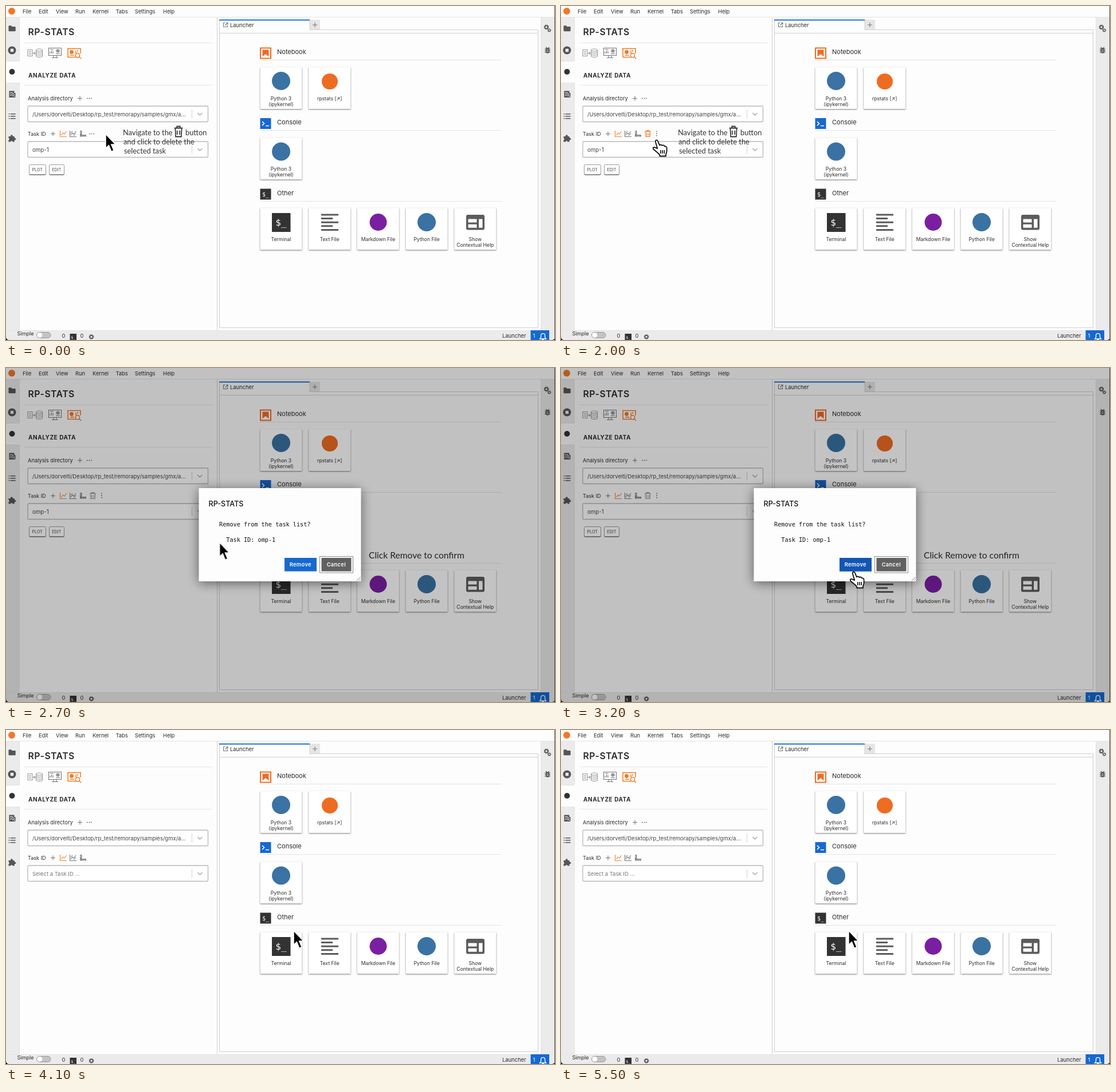
Write an HTML page that moves like this. It is 958x584 px and loops after 5600 ms.

```html
<!DOCTYPE html>
<html lang="en">
<head>
<meta charset="utf-8">
<title>Delete a task</title>
<style>
  html, body { margin: 0; width: 100%; height: 100%; overflow: hidden; background: #fefdfe; }
  svg { display: block; width: 958px; height: 584px; }
  text { font: 9.3px Inter, sans-serif; fill: #2b2b2b; white-space: pre; }
  .c { text-anchor: middle; }
  .line { fill: none; stroke: #e4e4e4; }
  .ui { fill: none; stroke: #777; stroke-width: 1.1; }
  .dark { fill: #555; }
  .title { font-size: 11px; }
  .label { font-size: 8.6px; text-anchor: middle; }
  .small { font-size: 7.2px; text-anchor: middle; fill: #444; }
  .note { font: 12.8px Lato, sans-serif; fill: #333; }
  .mono { font: 10.2px "DejaVu Sans Mono", monospace; fill: #111; }
  .btn { font-size: 9.4px; font-weight: 600; letter-spacing: .3px; fill: #fff; text-anchor: middle; }
  .prompt { font-family: "DejaVu Sans Mono", monospace; fill: #fff; text-anchor: middle; }
  .card { fill: #fff; filter: drop-shadow(0 1px 1.3px #0008); }
</style>
</head>
<body>
<svg viewBox="0 0 958 584">
  <defs>
    <g id="trash" fill="none" stroke="currentColor" stroke-width="1.2">
      <path d="M-5.2-3.6H5.2M-2-3.8V-5.4H2V-3.8M-4-3.4L-3.5 5.4H3.5L4-3.4M-1.6-1V3.4M1.6-1V3.4"/>
    </g>
    <g id="select">
      <rect x="38" y="-14" width="314.5" height="27.5" rx="2" fill="#fff" stroke="#b9b9b9" stroke-width="1.3"/>
      <path d="M324.5-8V8" stroke="#d2d2d2"/>
      <path d="M334.3-2L338.3 2 342.3-2" fill="none" stroke="#aaa" stroke-width="1.5"/>
    </g>
    <g id="gear">
      <circle r="2.6" fill="none" stroke="#555" stroke-width="1.7"/>
      <circle r="3.8" fill="none" stroke="#555" stroke-width="1.3" stroke-dasharray="1.5 1.48"/>
    </g>
  </defs>

  <!-- window frame -->
  <rect width="958" height="584" fill="#fefdfe"/>
  <path d="M0 20H23V567H0ZM933 20H958V567H933ZM0 567H958V584H0Z" fill="#ebebeb"/>
  <path d="M0 96.5H23V134.5H0Z" fill="#fefdfe"/>
  <path class="line" stroke="#d5d5d5" d="M0 19.5H958M23.5 20V96M23.5 134V567M0 96.5H23M0 134.5H23M933.5 20V567M0 567.5H958"/>
  <path d="M368.5 20V567" stroke="#d0d0d0"/>
  <circle cx="10" cy="9" r="6" fill="#f37726"/>
  <g id="menu"></g>

  <!-- side bars -->
  <path class="dark" d="M4.5 35.5Q4.5 34.3 5.7 34.3H9L10.5 36H15.5Q16.7 36 16.7 37.2V43Q16.7 44.2 15.5 44.2H5.7Q4.5 44.2 4.5 43Z"/>
  <circle cx="10.5" cy="77.5" r="7" class="dark"/>
  <rect x="7.8" y="74.8" width="5.4" height="5.4" fill="#ebebeb"/>
  <circle cx="10.5" cy="115" r="5" fill="#333"/>
  <path class="dark" d="M5.5 148.5H14.5V152H16.5V160H5.5Z"/>
  <path d="M7 151.5H12M7 154H9M7 156.5H9" stroke="#eee"/>
  <circle cx="12.2" cy="155.2" r="2" fill="none" stroke="#eee"/>
  <path d="M13.5 156.7L16 159.2" stroke="#eee"/>
  <path d="M4.7 188.8H6.4M7.7 188.8H16.6M4.7 192.8H6.4M7.7 192.8H16.6M4.7 196.8H6.4M7.7 196.8H16.6" stroke="#555" stroke-width="1.5"/>
  <path class="dark" d="M4.5 228H8A2 2 0 1 1 11.7 228H14.7V230.6A2 2 0 1 1 14.7 234.4V237.5H11.7A1.9 1.9 0 0 0 8 237.5H4.5V234.3A1.9 1.9 0 0 0 4.5 230.7Z"/>
  <use href="#gear" x="943" y="37"/>
  <use href="#gear" transform="translate(948 42.5) scale(.75)"/>
  <ellipse cx="945" cy="78" rx="3.4" ry="4.7" class="dark"/>
  <path d="M940 75H950M940 78H950M940 81H950M942 72L944 74M948 72L946 74" stroke="#555" stroke-width="1.2"/>
  <path d="M943.5 77H946.5M943.5 79.6H946.5" stroke="#ebebeb"/>

  <!-- left panel -->
  <text x="38.5" y="51.3" style="font-size:15.8px;font-weight:600;letter-spacing:.5px">RP-STATS</text>
  <path class="line" d="M32 64.5H360M32 138.5H360"/>
  <g fill="none" stroke="#999" stroke-width="1.1">
    <path d="M38 76.5H46V87.5H38ZM40 79.5H44M40 82H44M40 84.5H44M46 82.5H51M49 80.5L51 82.5 49 84.5"/>
    <path d="M52.5 77V87.5C52.5 90 63.5 90 63.5 87.5V77M52.5 80.5C52.5 83 63.5 83 63.5 80.5M52.5 84C52.5 86.5 63.5 86.5 63.5 84"/>
    <ellipse cx="58" cy="77" rx="5.5" ry="2"/>
    <path stroke="#777" d="M74.5 73.5H96.5V86.5H74.5ZM83 86.5V90M88 86.5V90M80 90.5H91M77 83V80M79.5 83V78M82 83V79M77 76H83M87 83.5H94"/>
    <circle cx="90.5" cy="78.5" r="2.7" fill="#999"/>
  </g>
  <g fill="none" stroke="#ee7b22" stroke-width="1.5">
    <path d="M122 89.5H108V74.5H130V83M107 74.5H131M122 83V78M125 80V77M112 86H119"/>
    <circle cx="114.5" cy="80.5" r="2.7" fill="#ee7b22"/>
    <circle cx="125" cy="86.3" r="3.6" fill="#fff"/>
    <path d="M127.8 89L131.3 92.3"/>
  </g>
  <text x="39" y="125" style="font-size:10px;font-weight:700;letter-spacing:.55px">ANALYZE DATA</text>
  <text x="38" y="165">Analysis directory</text>
  <path class="ui" d="M125 161.5H133M129 157.5V165.5"/>
  <path d="M141 161.5H150" stroke="#666" stroke-width="1.7" stroke-dasharray="1.7 1.9"/>
  <use href="#select" y="189"/>
  <text x="46" y="192.5" style="font-size:9.5px;fill:#444">/Users/dorvelti/Desktop/rp_test/remorapy/samples/gmx/a...</text>
  <text x="38" y="227" style="font-size:9.1px">Task ID</text>
  <path class="ui" d="M78 223.5H86M82 219.5V227.5"/>
  <path d="M94.5 218V228.5H106M96.5 226L99.5 222 102 224 105.5 219" fill="none" stroke="#ee8a32" stroke-width="1.2"/>
  <path class="ui" d="M111.5 218V228.5H123M113 226L116 222 118 224 122 219M113 222.5L116 219M118 227L122 222.5"/>
  <path d="M129 218H132.5V225H140V228.5H129Z" fill="#8b8b8b"/>
  <path d="M129 220H131M129 222H131M134 228.5V226.8M137 228.5V226.8" stroke="#eee" stroke-width=".8"/>
  <path id="dots" d="M145 223.5H154" stroke="#666" stroke-width="1.7" stroke-dasharray="1.7 1.9"/>
  <path id="menuDots" d="M167 218.5V227.5" stroke="#777" stroke-width="1.7" stroke-dasharray="1.7 1.9"/>
  <use id="trashHot" href="#trash" x="151.5" y="223" color="#ee7b22"/>
  <use id="trashIdle" href="#trash" x="151.5" y="223" color="#959595"/>
  <use href="#select" y="251"/>
  <text id="placeholder" x="46" y="254.5" style="font-size:9.5px;fill:#777">Select a Task ID ...</text>
  <g id="task">
    <text x="46" y="254.5" style="font-size:9.7px;fill:#444">omp-1</text>
    <g fill="#fff" stroke="#999" style="filter:drop-shadow(.5px 1px .7px #0007)">
      <rect x="40.5" y="277.5" width="29" height="17" rx="2"/>
      <rect x="75.5" y="277.5" width="26" height="17" rx="2"/>
    </g>
    <text class="small" x="54.7" y="288.6">PLOT</text>
    <text class="small" x="88.3" y="288.6">EDIT</text>
  </g>

  <!-- launcher -->
  <path d="M530 24H548V42H530Z" fill="#e6e6e6"/>
  <path d="M372.5 24V562.5H928.5V41.5H530V24M372.5 47.5H928.5" fill="none" stroke="#cfcfcf"/>
  <path d="M372 24.5H530" stroke="#1976d2" stroke-width="2"/>
  <path class="ui" d="M382.5 29.5H379.5V36.5H386.5V33.5M384 29.5H387V32.5M387 29.5L382.5 34M535 33H543M539 29V37"/>
  <text x="391" y="36.5" style="font-size:9.4px">Launcher</text>
  <g id="sections"></g>
  <rect x="444" y="73.5" width="18" height="18" fill="#fff" stroke="#ee6c22" stroke-width="2"/>
  <path d="M447.5 76.5H458.5V88.5L453 84 447.5 88.5Z" fill="#ee6c22"/>
  <rect x="443.5" y="196" width="19" height="19" fill="#1769cf"/>
  <path d="M447 202L450.5 205.5 447 209M453 209.5H459" fill="none" stroke="#fff" stroke-width="1.6"/>
  <rect x="443.5" y="319.5" width="19" height="19" fill="#333"/>
  <text class="prompt" x="453" y="333" style="font-size:10px">$_</text>
  <g id="cards"></g>
  <circle cx="480" cy="131" r="16" fill="#3a72a4"/>
  <circle cx="565" cy="132" r="14" fill="#ee6c22"/>
  <circle cx="480" cy="254.5" r="16" fill="#3a72a4"/>
  <circle cx="649.5" cy="378" r="15" fill="#7b1fa2"/>
  <circle cx="734" cy="378" r="16" fill="#3a72a4"/>
  <rect x="464" y="362" width="32.5" height="33" fill="#333"/>
  <text class="prompt" x="480" y="384" style="font-size:16px">$_</text>
  <path d="M550 365H580M550 371.6H570M550 378.2H580M550 384.8H570M550 391.4H580" stroke="#5c5c5c" stroke-width="3"/>
  <rect x="803" y="365" width="32" height="26.5" rx="3" fill="#5c5c5c"/>
  <path d="M806.5 372.5H821.5V378.5H806.5ZM806.5 381.8H821.5V387.8H806.5ZM825 372.5H831.5V387.8H825Z" fill="#fff"/>

  <!-- status bar -->
  <text x="19.5" y="576.3" style="font-size:9.1px">Simple</text>
  <rect x="53.5" y="570.5" width="24.5" height="10" rx="5" fill="#c4c4c4" stroke="#999"/>
  <circle cx="58.7" cy="575.5" r="4.5" fill="#fff"/>
  <text class="c" x="100.5" y="580">0</text>
  <rect x="111.5" y="573" width="11.5" height="11" fill="#333"/>
  <text class="prompt" x="117.2" y="581.5" style="font-size:6.5px">$_</text>
  <text class="c" x="132.5" y="580">0</text>
  <use href="#gear" x="149" y="578.5"/>
  <text x="866" y="580" style="font-size:9.4px">Launcher</text>
  <rect x="915.5" y="567" width="32.5" height="17" fill="#1769cf"/>
  <text class="c" x="921.5" y="580" style="fill:#fff">1</text>
  <path d="M931.5 582H942.5L940.5 579.5V576C940.5 571.5 933.5 571.5 933.5 576V579.5ZM935.5 583.3H938.5" fill="none" stroke="#fff" stroke-width="1.3"/>
  <path d="M0 578V584H6Q0 584 0 578ZM958 578V584H952Q958 584 958 578Z"/>
  <path d="M957.5 0V584" stroke="#555"/>

  <!-- guidance and dialog -->
  <g id="hint">
    <text class="note" x="204" y="225.7">Navigate to the</text>
    <text class="note" x="313" y="225.7">button</text>
    <text class="note" x="205" y="241.8">and click to delete the</text>
    <text class="note" x="206" y="257.8">selected task</text>
    <use href="#trash" transform="translate(301 219.5) scale(1.4 1.65)" color="#333"/>
  </g>
  <g id="dialog">
    <rect width="958" height="584" opacity=".235"/>
    <rect x="336.5" y="210" width="283" height="163" rx="1" fill="#fefdfe" style="filter:drop-shadow(0 3px 10px #0008)"/>
    <text x="353.5" y="242.3" style="font-size:12.6px;font-weight:500;fill:#111">RP-STATS</text>
    <text class="mono" x="372" y="277">Remove from the task list?</text>
    <text class="mono" x="384.3" y="303.7">Task ID: omp-1</text>
    <rect x="486" y="332" width="56" height="23.5" fill="#1669cf"/>
    <rect id="removeHot" x="486" y="332" width="56" height="23.5" fill="#1256b5"/>
    <text class="btn" x="513.8" y="347.3">Remove</text>
    <rect x="547.5" y="329.5" width="58" height="28.5" fill="none" stroke="#8a8a8a"/>
    <rect x="550.5" y="332" width="52" height="23.5" fill="#616161"/>
    <text class="btn" x="576.3" y="347.3">Cancel</text>
    <path d="M612 372L618.5 365.5M616 372L618.5 369.5" stroke="#888"/>
  </g>
  <text id="confirm" class="note" x="633" y="333" style="font-size:15.6px;fill:#222">Click Remove to confirm</text>

  <g id="cursor">
    <path id="arrow" d="M0 0V24.5L5.4 19.4 9.8 30.3 14 28.5 9.6 17.9H17Z" fill="#000" stroke="#fff" stroke-width="1.4"/>
    <g id="hand" stroke="#111" stroke-linejoin="round">
      <path d="M7 9C6 5 9.8 4.4 11 7.4L14 14.4C15.8 13 17.8 13.3 18.6 15.1 20.4 13.8 22.4 14.6 23 16.5 25 15.8 26.6 17.2 26.6 19.4V24.5C26.6 27.5 25 29 25 31V33.5H14.3V31.5C12.5 28.5 8.5 26 4 22 1.2 19.4 3.6 16.8 6.4 18.4L10.3 20.3Z"
        fill="#fff" stroke-width="1.8"/>
      <path d="M15.8 23V29M19 23V29M22.2 23V29" stroke-width="1.6"/>
    </g>
  </g>
</svg>
<script>
  const LOOP = 5600;
  const byId = id => document.getElementById(id);
  const label = (x, y, s, cls = '') => `<text class="${cls}" x="${x}" y="${y}">${s}</text>`;

  byId('menu').innerHTML = [
    ['File', 29], ['Edit', 57], ['View', 87], ['Run', 121],
    ['Kernel', 151], ['Tabs', 191.5], ['Settings', 224.7], ['Help', 274]
  ].map(([name, x]) => label(x, 12.7, name)).join('');

  byId('sections').innerHTML = [['Notebook', 84], ['Console', 207], ['Other', 330.5]]
    .map(([name, y]) => label(473, y, name, 'title') +
      `<path class="line" d="M443 ${Math.round(y) + 10.5}H864"/>`).join('');

  const rows = [
    [107, ['Python 3|(ipykernel)', 'rpstats [↗]']],
    [230.3, ['Python 3|(ipykernel)']],
    [353.3, ['Terminal', 'Text File', 'Markdown File', 'Python File', 'Show|Contextual Help']]
  ];
  byId('cards').innerHTML = rows.map(([y, names]) => names.map((name, i) => {
    const x = 443.5 + 84.7 * i;
    return `<rect class="card" x="${x}" y="${y}" width="73" height="73" rx="1"/>` +
      name.split('|').map((s, k) => label(x + 36.5, y + 57.5 + 10.2 * k, s, 'label')).join('');
  }).join('')).join('');

  // Hard on/off switching over [from, to] spans in ms.
  function show(id, ...spans) {
    const times = [0, ...spans.flat(), LOOP];
    const marks = [...new Set(times)].sort((a, b) => a - b);
    const frames = marks.map(t => ({
      offset: t / LOOP,
      opacity: spans.some(([from, to]) => t >= from && t < to) ? 1 : 0,
      easing: 'step-end'
    }));
    byId(id).animate(frames, { duration: LOOP, iterations: Infinity });
  }

  const OPEN = 1000, CLICK = 2100, REMOVED = 4100;
  show('dots', [0, OPEN]);
  show('menuDots', [OPEN, REMOVED]);
  show('trashHot', [OPEN, CLICK]);
  show('trashIdle', [CLICK, REMOVED]);
  show('task', [0, REMOVED]);
  show('placeholder', [REMOVED, LOOP]);
  show('hint', [0, CLICK]);
  show('dialog', [CLICK, REMOVED]);
  show('confirm', [CLICK, 3700]);
  show('removeHot', [3000, REMOVED]);
  show('arrow', [0, 600], [CLICK, 3000], [REMOVED, LOOP]);
  show('hand', [600, CLICK], [3000, REMOVED]);

  const path = [
    [0, 174, 224], [200, 174, 224], [600, 158, 229],
    [2300, 158, 229], [3000, 502, 351], [LOOP, 502, 351]
  ];
  byId('cursor').animate(path.map(([t, x, y]) => ({
    offset: t / LOOP, transform: `translate(${x}px, ${y}px)`, easing: 'ease-in-out'
  })), { duration: LOOP, iterations: Infinity });
</script>
</body>
</html>
```
